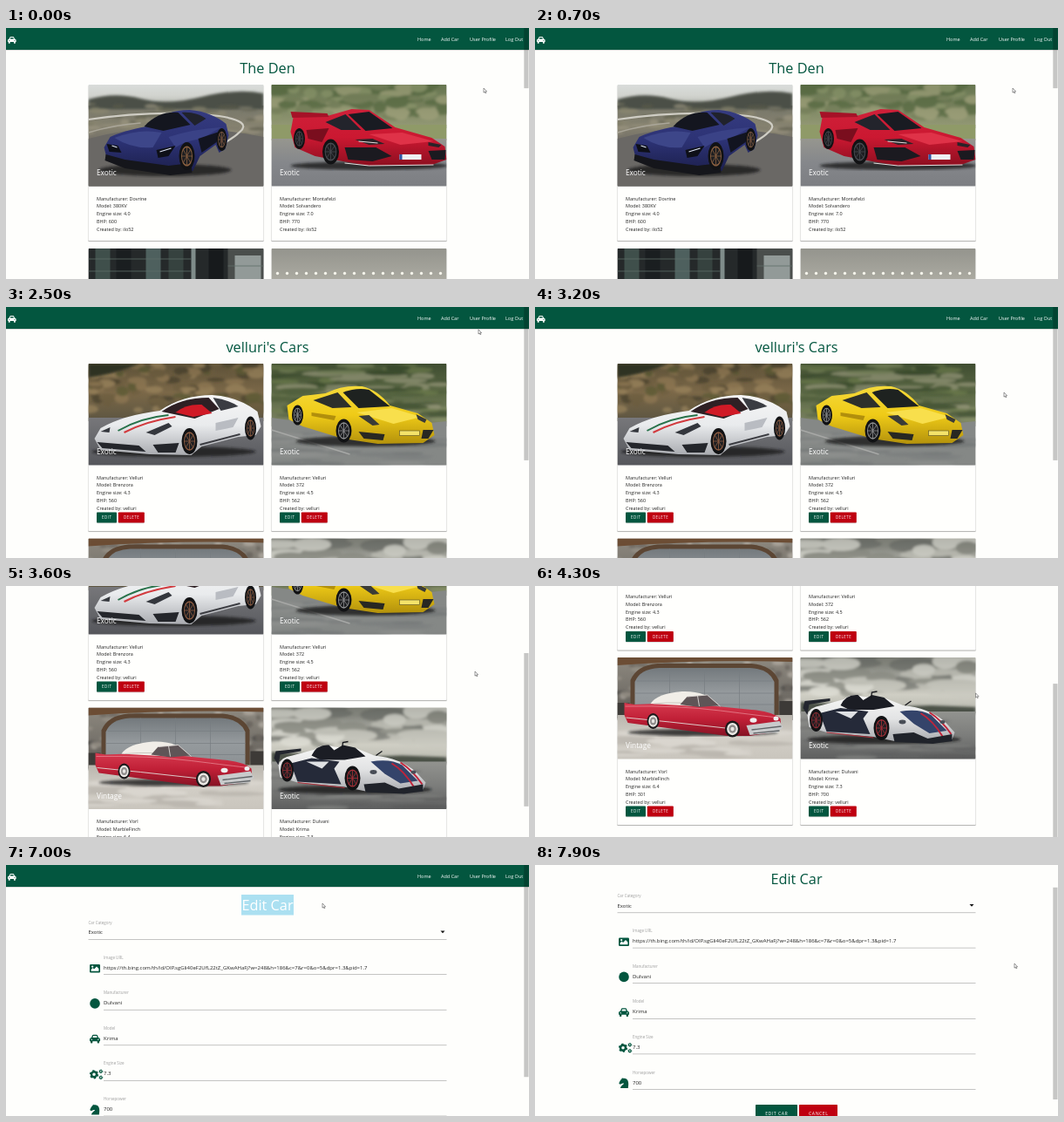
Animation of 600x288 px, one loop 8000 ms. Source, as an HTML page:

```html
<!DOCTYPE html>
<html lang="en">
<head>
<meta charset="utf-8">
<title>Car collection</title>
<style>
  html, body { margin: 0; width: 100%; height: 100%; overflow: hidden; background: #fefefc; }
  svg { display: block; width: 600px; height: 288px; }
  text { font-family: "Open Sans", "Noto Sans", sans-serif; white-space: pre; }
</style>
</head>
<body>
<svg id="stage" viewBox="0 0 600 288"></svg>
<script>
const GREEN = '#03563f', RED = '#bf0010', INK = '#222';
const SITE = '8080-dev283640-mp3-lfa2if16ncd.ws-eu106.gitpod.io';
const stage = document.getElementById('stage');

let seed = 7;
const random = () => (seed = seed * 16807 % 2147483647) / 2147483647;

// Shape helpers
const text = (x, y, s, size = 5.45, fill = INK, attrs = '') =>
  `<text x="${x}" y="${y}" font-size="${size}" fill="${fill}" ${attrs}>${s.replace(/&/g, '&amp;')}</text>`;
const rect = (x, y, w, h, fill, attrs = '') =>
  `<rect x="${x}" y="${y}" width="${w}" height="${h}" fill="${fill}" ${attrs}/>`;
const path = (d, fill, attrs = '') => `<path d="${d}" fill="${fill}" ${attrs}/>`;
const line = (d, stroke, width = 1) => path(d, 'none', `stroke="${stroke}" stroke-width="${width}"`);
const oval = (x, y, rx, ry, fill, attrs = '') =>
  `<ellipse cx="${x}" cy="${y}" rx="${rx}" ry="${ry}" fill="${fill}" ${attrs}/>`;
const at = (x, y, body, scale = 1) => `<g transform="translate(${x} ${y}) scale(${scale})">${body}</g>`;
const soft = body => `<g filter="url(#soft)">${body}</g>`;

// Path filled from top to bottom with evenly spaced colours
let gradients = 0;
const paint = (d, ...colors) => {
  const id = 'paint' + gradients++;
  return `<linearGradient id="${id}" x2="0" y2="1">` +
    colors.map((c, i) => `<stop offset="${i / (colors.length - 1)}" stop-color="${c}"/>`).join('') +
    `</linearGradient>` + path(d, `url(#${id})`);
};
const band = (y, h, ...colors) => paint(`M0 ${y}H201V${y + h}H0Z`, ...colors);
const specks = (n, y, h, colors, rx, ry) => soft('<g opacity=".6">' + Array.from({ length: n }, () =>
  oval(random() * 201, y + random() * h, rx * (.5 + random()), ry * (.5 + random()),
    colors[Math.floor(random() * colors.length)])).join('') + '</g>');
const shadow = (x, y, rx, ry) => soft(oval(x, y, rx, ry, '#18191c', 'opacity=".8"'));
const wheel = (x, y, rx, ry, rim = '#55585c') => {
  let spokes = '';
  for (let a = 0; a < 6.2; a += Math.PI / 4)
    spokes += `M${x} ${y}L${x + Math.cos(a) * rx * .68} ${y + Math.sin(a) * ry * .68}`;
  return oval(x, y, rx, ry, '#111214') + oval(x, y, rx * .72, ry * .72, rim) +
    oval(x, y, rx * .62, ry * .62, '#1d1e21') + line(spokes, rim, .8);
};
const whitewall = (x, y, rx, ry) => oval(x, y, rx, ry, '#1a191a') +
  oval(x, y, rx * .75, ry * .75, '#eceae6') + oval(x, y, rx * .5, ry * .5, '#8f8c8b') + oval(x, y, rx * .25, ry * .25, '#e8e6e3');

const scenes = {
  blue: () => band(0, 24, '#d9dcda', '#d2d4cf', '#b9bbb4') + band(24, 93, '#77776a', '#85816f', '#6d6a64', '#504f4e', '#3c3b3c') +
    soft(path('M0 17Q30 8 60 16T130 14T201 10V28H0Z', '#4c5046')) +
    specks(60, 22, 36, ['#8f8b70', '#5a5c4a', '#a09a84'], 9, 2) +
    path('M0 62Q90 38 201 60V117H0Z', '#6a6865') +
    line('M0 40Q80 28 150 36Q188 42 174 54Q166 62 150 70', '#cfcdc4', 2.2) +
    line('M0 55Q30 46 60 44', '#aaa699', 1.4) + shadow(88, 98, 76, 7) +
    paint('M18 72L25 60C40 53 58 50 70 47C83 34 98 29 116 29C134 30 148 37 158 45L161 58L157 74L150 78L146 69L128 82L120 99L94 101L44 93L21 84Z', '#353b80', '#2c3274', '#1c1f4c') +
    path('M64 48C76 35 88 31 103 32L117 46L86 53Z', '#14161f') +
    path('M107 32C118 31 128 34 135 39L122 47Z', '#20222c') +
    path('M30 61Q58 50 84 55L74 72Q50 74 30 61Z', '#3d4689') +
    path('M92 60Q120 51 152 49L130 62Q112 64 100 72Z', '#3a4286') +
    path('M126 62L150 54L147 66L130 78Z', '#121420') +
    path('M21 68L34 70L38 78L24 77ZM78 75L100 70L92 82L80 84Z', '#0e1018') +
    path('M20 80L42 86L92 93L118 90L119 101L94 104L42 96L19 87Z', '#15161b') +
    line('M27 70L33 72M82 77L95 73', '#dfe6f4', 1.2) +
    wheel(113, 82, 9, 16, '#8a6040') + wheel(153, 63, 6, 13, '#76543f'),

  red: () => band(0, 50, '#66754f', '#7c8662', '#959a76') + specks(90, 0, 36, ['#4d6039', '#8b946c', '#707c55', '#a3a37e'], 12, 5) +
    rect(0, 46, 201, 18, '#8f9a68') + band(62, 55, '#96968f', '#85878b', '#7c7e82') + shadow(112, 93, 90, 5) +
    paint('M25 38L40 34L64 36L92 28L112 29L142 49L184 61L199 71L201 86L184 92L112 93L82 88L50 82L27 72L22 54Z', '#cf2039', '#cb1831', '#8d0f20') +
    path('M88 34L112 31L139 50L108 53Z', '#191b22') +
    path('M62 43L85 34L103 52L80 52Z', '#23242c') +
    path('M24 38L22 31L64 33L66 37Z', '#a51227') +
    path('M40 52L66 50L58 66L42 62Z', '#7a0e1e') +
    path('M112 57L150 55L186 65L148 69Z', '#df3248') +
    path('M84 72L120 72L138 82L116 88L88 86ZM180 76L200 75L199 86L184 86Z', '#1b1a20') +
    path('M96 63L116 62L130 68L112 69ZM180 66L195 69L192 72L180 70Z', '#2a2328') +
    line('M100 65L122 67M84 90L112 93L186 92', '#e8dfe0', 1) +
    rect(147, 80, 25, 6, '#eef0f4') + rect(147, 80, 3, 6, '#2e55a5') +
    wheel(68, 77, 9.5, 14.5, '#474a50') + wheel(32, 62, 6.5, 12, '#43464c'),

  white: () => band(0, 66, '#5d5138', '#7b6848', '#5c5541') + specks(120, 0, 54, ['#3c3626', '#947e56', '#6b5b3e', '#53552f', '#a28a62'], 8, 4) +
    soft(path('M0 0H60Q30 12 0 16Z', '#2f3122')) + band(62, 55, '#77777a', '#66676b', '#55565b') + shadow(98, 101, 94, 6) +
    paint('M7 86L14 74Q40 59 82 54Q108 36 142 36Q172 38 194 55L198 72L192 82L172 84L130 95L118 105L70 104L14 99Z', '#f6f6f6', '#e9ebed', '#a9abb0') +
    path('M84 55Q106 39 138 39L150 52L122 63Z', '#2e2024') +
    path('M100 56Q112 46 130 47L142 57L120 61Z', '#d01a26') +
    path('M143 39Q160 41 172 49L152 54Z', '#3a3c42') +
    line('M34 77Q60 62 92 59', '#28724a', 2) + line('M41 79Q66 66 100 61', '#d23a3e', 2) +
    path('M66 79L92 68L96 72L76 82ZM14 78L25 73L24 79Z', '#34373d') +
    path('M10 90L58 94L66 101L16 97ZM74 93L104 91L100 102L80 102Z', '#24262b') +
    path('M146 68L172 62L166 73L146 77Z', '#b9bcc2') + line('M128 93L174 81', '#3b3c41', 2) +
    wheel(116, 89, 9, 15, '#8d5c42') + wheel(186, 74, 6.5, 13.5, '#83573f'),

  yellow: () => band(0, 72, '#3f4d31', '#5d6a46', '#7d8365') + specks(110, 0, 66, ['#33432a', '#6f7f4e', '#8b9469', '#4b5b38', '#a2a184'], 20, 2.5) +
    path('M0 62Q100 78 201 66V117H0Z', '#858886') + specks(30, 80, 40, ['#777a7b', '#919391', '#6d7072'], 30, 2) +
    line('M0 76L90 104', '#a7a8a6', 1.5) + shadow(108, 89, 80, 6) +
    paint('M18 48L36 37L62 34Q82 24 104 26Q122 30 136 48L168 57L184 68L187 82L174 91L122 92L82 86L36 72L20 64Z', '#f5d93a', '#efcb17', '#b4920c') +
    path('M82 33Q98 27 112 30L136 49L100 51Z', '#1e2220') +
    path('M48 42L76 33L92 50L70 51Z', '#2d302b') +
    path('M98 56L138 51L172 61L140 69Z', '#f8df4c') +
    path('M100 60L112 59L124 70L116 71ZM166 58L178 64L176 68L168 64Z', '#3a3b37') +
    path('M100 78L130 81L128 88L106 86ZM174 76L186 76L180 86L172 86Z', '#282822') +
    path('M46 56L74 60L72 65L46 60Z', '#b18f0c') +
    rect(147, 77, 23, 5.5, '#f4e36a', 'stroke="#564f25" stroke-width=".6"') +
    wheel(83, 77, 9, 13.5, '#8d8f91') + wheel(30, 59, 6.5, 11.5, '#888b8c'),

  classic: () => band(0, 72, '#8e897f', '#77736c', '#56524d') + specks(90, 6, 62, ['#3a3937', '#a39d92', '#5e5953', '#c0bab0'], 5, 3) +
    path('M15 68V26Q22 9 46 7H154Q178 9 185 26V68Z', '#5c4634') +
    paint('M20 68V28Q26 13 48 12H152Q174 13 180 28V68Z', '#73797d', '#959a9d', '#8c9194') +
    line('M22 27H178M20 41H180M20 54H180M60 12V66M100 12V66M140 12V66', '#777d81', .7) +
    path('M0 0H201V5Q100 2 0 9Z', '#6c4d34') + path('M0 52H14V70H0ZM186 50H201V72H186Z', '#3d3a37') +
    band(66, 51, '#b9b5ad', '#d2cec6', '#c9c5bd') + specks(24, 84, 33, ['#b3aea6', '#e0ddd6'], 24, 3) + shadow(98, 86, 86, 4) +
    paint('M8 52L20 54Q70 51 114 56L154 60Q178 62 187 70L188 80L178 86L152 90L126 90L50 80L12 75L8 66Z', '#d63a4f', '#c01f36', '#861324') +
    line('M9 56Q70 55 118 61T184 69', '#e78390', .8) + line('M10 69L60 74L124 81', '#e3dcd9', .9) +
    path('M38 53Q46 41 74 39Q102 38 115 54L90 56Z', '#f1eee8') + line('M42 53Q76 50 92 55', '#c2bdb6', .8) +
    path('M72 54L80 45L103 43L117 55L94 57Z', '#5f5557') + line('M80 45L103 43L118 56M92 44L94 56', '#dfdbd7', .9) +
    path('M148 78L186 73L190 80L184 86L152 89Z', '#c9cbcc') + line('M154 83L188 79M156 87L186 84', '#5f6366', 1.3) +
    oval(156, 72, 4, 2.8, '#eee') + oval(182, 70, 3, 2.5, '#eee') +
    whitewall(41, 73, 7, 9) + whitewall(132, 82, 8.5, 9.5),

  carbon: () => band(0, 64, '#6d6f68', '#a0a199', '#cfcec4', '#b5b5ab') +
    specks(60, 0, 40, ['#65675f', '#e4e4dc', '#82847b', '#c8c8be'], 24, 6) +
    soft(path('M0 51L40 53L90 57L150 55L201 57V65H0Z', '#4c5147')) + band(62, 55, '#92938f', '#7c7d7b', '#5d5e5e') +
    specks(30, 68, 49, ['#6a6b6a', '#8d8e8b', '#555657'], 24, 1.6) + shadow(96, 94, 88, 5) +
    path('M3 58L5 50L34 47L34 50L10 54L8 66Z', '#23262e') +
    paint('M8 66Q10 57 24 55L50 48Q58 41 72 45L98 47L118 55Q148 58 166 74L177 86L174 94L150 98L108 96L84 91L30 86L10 80Z', '#f7f7f6', '#e2e3e4', '#a5a7ab') +
    path('M46 55Q52 42 66 43L72 49L82 43L96 46L108 56L84 60L56 60Z', '#1b1d24') +
    path('M22 64L46 58L78 62L72 70L80 88L30 85Z', '#252a39') + path('M40 62L66 62L58 70Z', '#dfe1e4') +
    path('M114 62Q136 58 150 66L168 84L148 87L130 76Z', '#34446a') +
    line('M138 64Q152 72 164 92M148 63Q162 72 173 88', '#c0243a', 2) +
    path('M106 88L130 86L146 93L174 88L174 96L152 99L108 97Z', '#20232a') +
    line('M30 86L84 92', '#b0303c', 1) + line('M81 47L82 40L88 39M120 55L127 50', '#15161a', 1.3) +
    oval(117, 74, 4, 2.4, '#484d56') + oval(163, 74, 3, 2, '#484d56') +
    wheel(93, 81, 9, 14, '#a63038') + wheel(18, 72, 7.5, 13, '#8c2c33'),

  building: () => rect(0, 0, 201, 117, '#25292a') +
    [8, 32, 66, 92, 138].map((x, i) => rect(x, 0, 17, 60, ['#3f4f4b', '#1a1e20', '#4e605e', '#36423f', '#171a1c'][i])).join('') +
    rect(118, 0, 5, 60, '#7f8c8a') + rect(160, 0, 41, 60, '#4a4e4c') + rect(168, 8, 30, 30, '#929a98') +
    line('M0 12H118M0 26H118M160 20H201', '#5e6d69', .8),

  wall: () => band(0, 117, '#94948d', '#adaca3', '#b5b4aa', '#b9b8ae') +
    Array.from({ length: 18 }, (_, i) => oval(7 + i * 11, 28.5, 1.7, 1.7, '#f6f5ec')).join('')
};

const button = (x, y, w, h, label, fill, size = 4.4) =>
  rect(x, y + .8, w, h, '#0003', 'rx="1"') + rect(x, y, w, h, fill, 'rx=".8"') +
  text(x + w / 2 + .25, y + h / 2 + size * .36, label, size, '#fff', 'text-anchor="middle" letter-spacing=".5" font-weight="500"');

function card(x, y, scene, category, facts, editable) {
  const height = editable ? 192 : 179;
  const labels = ['Manufacturer', 'Model', 'Engine size', 'BHP', 'Created by'];
  return at(x, y,
    rect(-.6, .4, 202.2, height + .8, '#0000001c', 'rx="1"') + rect(0, .8, 201, height + .3, '#00000030', 'rx="1"') +
    rect(0, 0, 201, height, '#fffffd', 'rx=".8"') +
    `<g clip-path="url(#photo)">${scenes[scene]()}</g>` +
    text(9.5, 104, category, 8.3, '#fff') +
    facts.map((f, i) => text(9.5, 132.6 + i * 8.75, `${labels[i]}: ${f}`)).join('') +
    (editable ? button(9.5, 170.5, 23, 12, 'EDIT', GREEN) + button(34.3, 170.5, 30, 12, 'DELETE', RED) : ''));
}

const carIcon = fill => path('M2 3.2L3 .8Q3.2 0 4.2 0H7.8Q8.8 0 9 .8L10 3.2Q12 3.6 12 5V7.5H11V9q0 .7-.7.7h-.9q-.7 0-.7-.7V7.6H3.3V9q0 .7-.7.7h-.9Q1 9.7 1 9V7.5H0V5Q0 3.6 2 3.2ZM3.4 3.2H8.6L7.9 1.4H4.1ZM1.6 4.6V6H3.6ZM10.4 4.6V6H8.4Z', fill, 'fill-rule="evenodd"');
const gear = (x, y, r) =>
  `<g fill="none" stroke="${GREEN}"><circle cx="${x}" cy="${y}" r="${r * .62}" stroke-width="${r * .5}"/>` +
  `<circle cx="${x}" cy="${y}" r="${r * .9}" stroke-width="${r * .35}" stroke-dasharray="${r * .47}"/></g>`;

const navbar = rect(0, 0, 600, 26, '#0002') + rect(0, 0, 600, 25, GREEN) +
  rect(526, 0, 42, 25, '#0000001f', 'class="hover"') + at(2, 10, carIcon('#fff'), .8) +
  [[472, 'Home'], [499, 'Add Car'], [532, 'User Profile'], [573, 'Log Out']]
    .map(([x, s]) => text(x, 14.5, s, 5.5, '#fff')).join('');
const heading = (s, fill = GREEN) => text(300, 52, s, 16.3, fill, 'text-anchor="middle"');

const field = (i, label, value, icon) => {
  const y = 106 + i * 40.6;
  return text(112, y + 1.6, label, 4.5, '#9e9e9e') + text(112, y + 13.6, value, 6) +
    rect(112, y + 19.3, 393.5, .6, '#9e9e9e') + at(96, y + 6, icon);
};

const pages = {
  hub: navbar + heading('The Den') +
    card(94.5, 65, 'blue', 'Exotic', ['Dovrine', '380KV', '4.0', '600', 'ilo52']) +
    card(304.5, 65, 'red', 'Exotic', ['Montafelzi', 'Solvandero', '7.0', '770', 'ilo52']) +
    card(94.5, 253, 'building', '', []) + card(304.5, 253, 'wall', '', []),
  profile: navbar + heading("velluri's Cars") +
    card(94.5, 65, 'white', 'Exotic', ['Velluri', 'Brenzora', '4.3', '560', 'velluri'], true) +
    card(304.5, 65, 'yellow', 'Exotic', ['Velluri', '372', '4.5', '562', 'velluri'], true) +
    card(94.5, 265.5, 'classic', 'Vintage', ['Vorl', 'MarbleFinch', '6.4', '301', 'velluri'], true) +
    card(304.5, 265.5, 'carbon', 'Exotic', ['Dulvani', 'Krima', '7.3', '700', 'velluri'], true),
  edit: navbar + heading('Edit Car') +
    `<g clip-path="url(#picked)">${rect(270, 34, 60, 23.5, '#abe0f1')}${heading('Edit Car', '#fff')}</g>` +
    text(94.5, 67.6, 'Car Category', 4.5, '#9e9e9e') + text(94.5, 79, 'Exotic', 6) +
    path('M498.5 75.5H503.5L501 78.3Z', '#111') + rect(94.5, 85, 411, .6, '#9e9e9e') +
    field(0, 'Image URL', 'https://th.bing.com/th/id/OIP.sgGli40eF2UfL22tZ_GKwAHaFj?w=248&h=186&c=7&r=0&o=5&dpr=1.3&pid=1.7',
      rect(0, 2, 12, 9.5, GREEN, 'rx="1.2"') + path('M1.6 9.8V8L3.6 6L5 7.4L8 4.4L10.4 7V9.8Z', '#fff') + oval(3.2, 4.6, 1.1, 1.1, '#fff')) +
    field(1, 'Manufacturer', 'Dulvani', oval(6, 6.3, 5.8, 5.8, GREEN)) +
    field(2, 'Model', 'Krima', at(0, 1.5, carIcon(GREEN))) +
    field(3, 'Engine Size', '7.3', gear(5, 6.5, 4.8) + gear(12.8, 3, 2.2) + gear(12.8, 10, 2.2)) +
    field(4, 'Horsepower', '700',
      path('M2 12H10.8C11.4 8 11.7 4 9 1.7C8 .8 6.5 .7 4.5 .8L4 0L3.6 1.4C2.6 2.2 1.5 3.7 .3 6.5L1.5 7.8L4.5 6.7H6C6 8.4 2.5 8.9 2 12Z', GREEN)) +
    button(253, 305.5, 48, 20, 'EDIT CAR', GREEN, 5.2) + button(303, 305.5, 44, 20, 'CANCEL', RED, 5.2)
};

stage.innerHTML =
  `<filter id="soft"><feGaussianBlur stdDeviation="1.4"/></filter>` +
  `<clipPath id="photo">${rect(0, 0, 201, 116.6, '#000', 'rx=".8"')}</clipPath>` +
  `<clipPath id="picked">${rect(270, 30, 0, 30, '#000', 'id="pick"')}</clipPath>` +
  rect(0, 0, 600, 288, '#fefefc') +
  Object.entries(pages).map(([id, body]) => `<g id="${id}">${body}</g>`).join('') +
  rect(594.3, 0, 5.2, 10, '#000', 'id="thumb" opacity=".22"') +
  `<g id="status">${rect(0, 280, 199, 8, '#cbcbcb', 'id="statusBox"')}${text(2, 285.6, ' ', 4.45, '#333', 'id="statusText"')}</g>` +
  `<g id="arrow">${path('M0 0V5.2L1.2 4.1L2 5.9L2.8 5.5L2 3.8H3.6Z', '#fff', 'stroke="#555" stroke-width=".6"')}</g>` +
  `<g id="hand">${path('M-.6 0Q0-.6.6 0V2.2L3 2.8Q3.6 3 3.4 4L2.8 6.4H-.6L-2.2 3.9Q-1.8 3-.6 4Z', '#fff', 'stroke="#222" stroke-width=".5"')}</g>`;

const $ = id => document.getElementById(id);
const set = (id, attrs) => { for (const k in attrs) $(id).setAttribute(k, attrs[k]); };
const show = (id, on) => set(id, { display: on ? 'inline' : 'none' });
const clamp = (v, lo, hi) => Math.min(hi, Math.max(lo, v));

// Pointer stops: time, x, y
const route = [[0, 548, 69], [900, 548, 69], [1500, 543, 8], [2300, 543, 8], [3000, 538, 98], [4100, 538, 98],
  [4900, 330, 257], [5900, 330, 257], [6400, 270, 46], [6600, 270, 46], [6900, 363, 44], [7200, 363, 44],
  [7600, 550, 113], [8000, 550, 113]];
function pointer(t) {
  const i = route.findIndex(stop => stop[0] > t);
  const [t0, x0, y0] = route[i - 1], [t1, x1, y1] = route[i];
  const p = (t - t0) / (t1 - t0), e = p * p * (3 - 2 * p);
  return [x0 + (x1 - x0) * e, y0 + (y1 - y0) * e];
}

function draw(t) {
  const page = t < 2300 ? 'hub' : t < 5600 ? 'profile' : 'edit';
  const length = { hub: 1200, profile: 471.5, edit: 341 }[page];
  const scroll = page === 'profile' ? clamp((t - 3200) * .315, 0, 183.5)
    : page === 'edit' ? clamp((t - 7600) * .125, 0, 30.5) : 0;
  for (const id in pages) show(id, id === page);
  set(page, { transform: `translate(0 ${-scroll})` });
  set('thumb', { y: scroll * 288 / length, height: 288 * 288 / length });

  const [x, y] = pointer(t);
  const onLink = page === 'hub' && y < 25 || page === 'profile' && t >= 4900;
  show('hand', onLink);
  show('arrow', !onLink);
  set(onLink ? 'hand' : 'arrow', { transform: `translate(${x} ${y})` });
  document.querySelectorAll('.hover').forEach(el => el.setAttribute('opacity', y < 25 ? 1 : 0));

  show('status', t >= 1900 && t < 2300 || t >= 5100 && t < 5600);
  set('statusBox', { width: page === 'hub' ? 155 : 199 });
  $('statusText').textContent = SITE + (page === 'hub' ? '/profile/velluri' : '/edit_car/656b4ef42c8d2fc83f477408');

  set('pick', { width: t >= 6600 && t < 7300 ? clamp(x - 270, 0, 60) : 0 });
}

// The picture advances ten times a second
function tick() {
  draw(Math.floor(performance.now() % 8000 / 100) * 100);
  requestAnimationFrame(tick);
}
tick();
</script>
</body>
</html>
```
